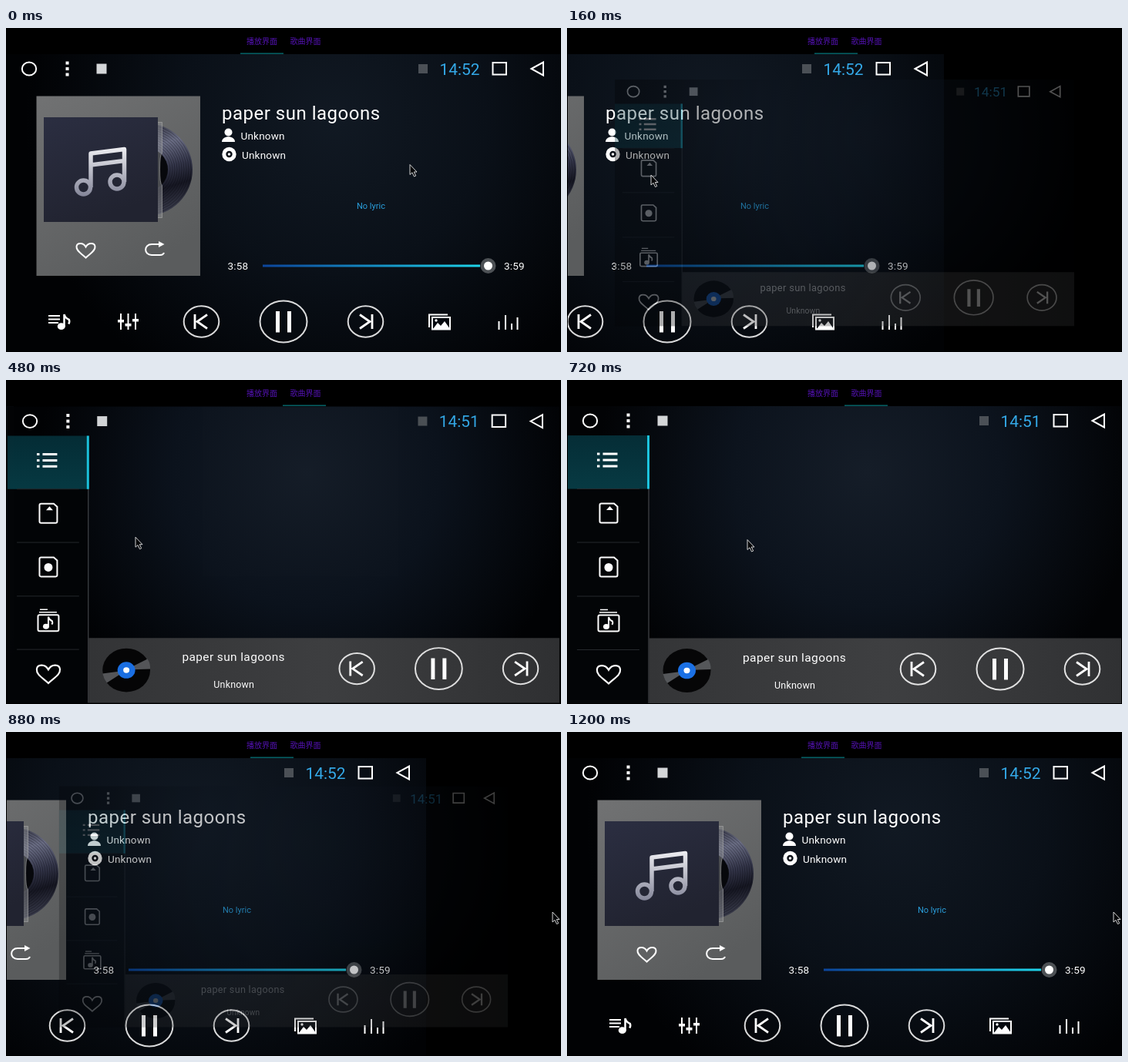
Animation of 720x421 px, one loop 2 s. Source, as an HTML page:

```html
<!DOCTYPE html>
<html lang="zh">
<head>
<meta charset="utf-8">
<style>
html, body { margin: 0; height: 100%; overflow: hidden; background: #000; }
svg { display: block; width: 100%; height: 100%; }
text { font-family: Roboto, sans-serif; fill: #fff; }
.tab { font: 10px "Noto Sans CJK SC", "Noto Sans CJK", sans-serif; fill: #5412b4; }
.clock { font-size: 20.9px; fill: #34a9e8; }
.title { font-size: 24px; letter-spacing: .5px; }
.info { font-size: 13.5px; letter-spacing: .2px; }
.line { fill: none; stroke: #fff; }
.thin { fill: none; stroke-width: 1; }
.fill { fill: #fff; }
</style>
</head>
<body>
<svg viewBox="0 0 720 421" stroke-width="2">
  <defs>
    <radialGradient id="bg1" gradientUnits="userSpaceOnUse" cx="425" cy="120" r="400">
      <stop stop-color="#111923"/><stop offset=".5" stop-color="#0a1018"/><stop offset="1" stop-color="#010204"/>
    </radialGradient>
    <radialGradient id="bg2" gradientUnits="userSpaceOnUse" cx="390" cy="120" r="350">
      <stop stop-color="#151d28"/><stop offset=".5" stop-color="#0c131d"/><stop offset="1" stop-color="#020305"/>
    </radialGradient>
    <linearGradient id="card" x2=".6" y2="1"><stop stop-color="#717273"/><stop offset="1" stop-color="#5a5c5d"/></linearGradient>
    <linearGradient id="cover" x2=".4" y2="1"><stop stop-color="#2b2e41"/><stop offset="1" stop-color="#212330"/></linearGradient>
    <linearGradient id="silver" gradientUnits="userSpaceOnUse" x1="0" y1="155" x2="0" y2="218">
      <stop stop-color="#eeeef2"/><stop offset="1" stop-color="#85879a"/>
    </linearGradient>
    <linearGradient id="vinyl" x1=".3" x2=".6" y2="1">
      <stop stop-color="#20212c"/><stop offset=".3" stop-color="#6a6d84"/><stop offset=".55" stop-color="#34364a"/>
      <stop offset=".75" stop-color="#161722"/><stop offset="1" stop-color="#3a3c4c"/>
    </linearGradient>
    <linearGradient id="progress" gradientUnits="userSpaceOnUse" x1="333" y1="0" x2="615" y2="0">
      <stop stop-color="#0c459c"/><stop offset="1" stop-color="#1ed3e8"/>
    </linearGradient>
    <linearGradient id="sel" x2="0" y2="1"><stop stop-color="#052d36"/><stop offset="1" stop-color="#073a43"/></linearGradient>
    <linearGradient id="panel" x2="1"><stop stop-color="#343537"/><stop offset=".5" stop-color="#3e3f41"/><stop offset="1" stop-color="#303133"/></linearGradient>
    <clipPath id="view"><path d="M1 34H719V420H1z"/></clipPath>

    <g id="status">
      <ellipse class="line" cx="30" cy="53" rx="9.2" ry="8.4"/>
      <path class="fill" d="M77.5 43.5h4v4h-4zM77.5 51h4v4h-4zM77.5 58.5h4v4h-4z"/>
      <path fill="#d4d6d8" d="M117.5 46.5h13v13h-13z"/>
      <path fill="#4b5056" d="M535 47h12v12h-12z"/>
      <path class="line" d="M631.5 45h17.5v15.5h-17.5zM681.5 53L697 44.5V61.5z"/>
    </g>
    <path id="heart" class="line" d="M0 9.5C-5.5 4-12.5 1-12-5C-11.5-10-3.5-11 0-4.5C3.5-11 11.5-10 12-5C12.5 1 5.5 4 0 9.5Z"/>
    <g id="skip">
      <ellipse class="line" rx="22.8" ry="20.2" stroke-opacity=".85"/>
      <path class="line" d="M-8.5-9.5V9.5M7.5-9L-5.5 0L7.5 9" stroke-width="2.8"/>
    </g>
    <g id="controls">
      <use href="#skip" x="253.5" y="381.5"/>
      <use href="#skip" transform="translate(466.5 381.5) scale(-1 1)"/>
      <ellipse class="line" cx="360" cy="381.5" rx="30.5" ry="27" stroke-opacity=".85"/>
      <path class="fill" d="M350 368h5v27.5h-5zM365 368h5v27.5h-5z"/>
    </g>
    <path id="sdcard" class="line" d="M-11-10.5Q-11-12.5-9-12.5H7.5L12-8.5V10.5Q12 12.5 10 12.5H-9Q-11 12.5-11 10.5Z"/>
    <g id="note">
      <ellipse class="fill" cx="-3" cy="4.5" rx="4" ry="3.5"/>
      <path class="line" d="M0 5V-8Q1-4 5-2.5Q6 0 4.5 2"/>
    </g>
  </defs>

  <text class="tab" x="312" y="20.5">播放界面</text>
  <text class="tab" x="368.5" y="20.5">歌曲界面</text>
  <path id="mark" d="M304 32.5h56v1.2h-56z" fill="#07787e"/>

  <g clip-path="url(#view)">
    <g id="player">
      <path d="M1 34H719V420H1z" fill="url(#bg1)"/>
      <use href="#status"/>
      <text class="clock" x="562.5" y="61">14:52</text>

      <path d="M39.5 88.5H252V322H39.5z" fill="url(#card)"/>
      <circle cx="182" cy="184" r="60" fill="url(#vinyl)"/>
      <g id="grooves" class="thin" stroke="#05060b" stroke-opacity=".3"></g>
      <circle cx="182" cy="184" r="28" fill="#07080c"/>
      <path d="M196 122.5h6.5v40q-3 2-3 21t3 21v42h-6.5z" fill="#8b8d92" fill-opacity=".5" stroke="#aaa" stroke-opacity=".6" stroke-width="1"/>
      <path d="M49 116h148v136h-148z" fill="url(#cover)"/>
      <g fill="none" stroke="url(#silver)" stroke-width="5.5" stroke-linejoin="round">
        <circle cx="100.5" cy="207" r="9"/>
        <circle cx="144" cy="200" r="9"/>
        <path d="M110 207V163L153.5 157.5V200M110 178L153.5 172.5"/>
      </g>
      <use href="#heart" x="103.5" y="289"/>
      <path class="line" d="M205 292Q204 295 200 295H189C178.5 295 178.5 281 189 281H200"/>
      <path class="fill" d="M198 277l7.500 4l-7.500 4z"/>

      <text class="title" x="280" y="118.500">paper sun lagoons</text>
      <circle class="fill" cx="288.500" cy="135.500" r="5"/>
      <path class="fill" d="M280 148c0-9 17-9 17 0z"/>
      <text class="info" x="304.500" y="145">Unknown</text>
      <circle class="fill" cx="289.500" cy="164" r="9.200"/>
      <circle cx="289.500" cy="164" r="3" fill="#fff" stroke="#0a0f17" stroke-width="2.400"/>
      <text class="info" x="306" y="169.500">Unknown</text>
      <text x="455" y="235" font-size="11" style="fill:#2a9fdc">No lyric</text>

      <text class="info" x="287.500" y="313.500">3:58</text>
      <text class="info" x="646" y="313.500">3:59</text>
      <path d="M333 307.500h282v3h-282z" fill="url(#progress)"/>
      <circle cx="625.500" cy="309" r="10" fill="#4d5155"/>
      <circle class="fill" cx="625.500" cy="309" r="5.500"/>

      <path class="line" d="M55 374h15M55 378.500h15M55 383h13"/>
      <use href="#note" transform="translate(75.500 382) scale(1.250)"/>
      <path class="line" d="M149 371v21M158.500 371v21M168 371v21"/>
      <path class="fill" d="M145 379h8v3.500h-8zM154.500 384h8v3.500h-8zM164 378h8v3.500h-8z"/>
      <use href="#controls"/>
      <path class="line" d="M549 389V372.500H573M553 376h23v15.500h-23z"/>
      <path class="fill" d="M554 391l6-8l4 4l5-6l7 10z"/>
      <circle class="fill" cx="558" cy="380" r="1.700"/>
      <path class="line" d="M639.500 381v11M648 373v19M656 384v8M663.500 376v16"/>
    </g>

    <g id="library">
      <path d="M1 34H719V420H1z" fill="url(#bg2)"/>
      <path d="M1 72H106V420H1z" fill="#030507"/>
      <use href="#status"/>
      <text class="clock" x="562.500" y="61">14:51</text>

      <path d="M1 72h105v69.500h-105z" fill="url(#sel)"/>
      <path class="thin" d="M13 141.500h81M13 211h81M13 281h81M13 350.500h81" stroke="#25292d"/>
      <path class="thin" d="M106 141v279" stroke="#505356"/>
      <path d="M104 72h3v69.500h-3z" fill="#1cc4de"/>
      <path class="line" d="M39 96h3.500M39 104h3.500M39 112h3.500M46.500 96h19M46.500 104h19M46.500 112h19" stroke-width="3"/>
      <use href="#sdcard" x="53.500" y="173"/>
      <path class="fill" d="M51 169l4.500-5l4.500 5z"/>
      <use href="#sdcard" x="53.500" y="243"/>
      <circle class="fill" cx="54" cy="243.500" r="5.500"/>
      <path class="line" d="M43 298.500h10M42 302h23" stroke-width="1.500"/>
      <rect class="line" x="40.500" y="305.500" width="27" height="21" rx="2"/>
      <use href="#note" x="54" y="316"/>
      <use href="#heart" transform="translate(54 382.500) scale(1.260)" stroke-width="1.700"/>

      <path d="M106.500 335.500H719V420H106.500z" fill="url(#panel)"/>
      <ellipse cx="155.500" cy="377.500" rx="31" ry="28.500" fill="#060607"/>
      <path d="M155 377L183 363Q187 369 186.500 376zM155 378L124.500 382Q126 389 130 394z" fill="#55575a"/>
      <ellipse cx="155.500" cy="377.500" rx="11.500" ry="10.800" fill="#1b70e4"/>
      <ellipse class="fill" cx="155.500" cy="377.500" rx="4" ry="3.700"/>
      <text x="228" y="365.500" font-size="15.500" letter-spacing=".4">paper sun lagoons</text>
      <text x="269" y="400.500" font-size="12.500" letter-spacing=".2">Unknown</text>
      <use href="#controls" x="202" y="-6"/>
    </g>
  </g>
  <path id="cursor" d="M0 0V13L3 10.300L5.500 15.500L7.700 14.500L5.300 9.500H9Z" fill="#050608" stroke="#e8e8e8" stroke-width=".9"/>
</svg>
<script>
const $ = id => document.getElementById(id);
const STEP = 80, LOOP = 2000, REST = 1200;

for (let r = 31; r < 60; r += 3)
  $('grooves').innerHTML += `<circle cx="182" cy="184" r="${r}"/>`;

// pointer stops: time, x, y
const stops = [[0, 524, 177.5], [80, 385, 184], [160, 109, 191], [240, 111, 196],
  [320, 124, 202], [720, 234, 207.5], [800, 450, 220], [880, 709, 234], [LOOP, 709, 234]];

function pointer(t) {
  const i = stops.findIndex(s => s[0] > t);
  const [t0, x0, y0] = stops[i - 1], [t1, x1, y1] = stops[i];
  const u = (t - t0) / (t1 - t0);
  return [x0 + (x1 - x0) * u, y0 + (y1 - y0) * u];
}

const settle = u => (1 - Math.min(u, 1)) ** 5;

// pager position: 0 = player, 1 = library; each swipe is a drag, then a settle
function position(t) {
  if (t >= REST) return 0;
  if (t <= 160) return .32 * (t / 160) ** 1.5;
  if (t < 720) return 1 - .68 * settle((t - 160) / 580);
  if (t <= 880) return 1 - .757 * ((t - 720) / 160) ** 1.5;
  return .243 * settle((t - 880) / 500);
}

function draw(now) {
  const t = Math.min(Math.floor(now % LOOP / STEP) * STEP, REST);
  const p = position(t);
  $('player').setAttribute('transform', `translate(${Math.round(-718 * p)} 0)`);
  $('library').setAttribute('transform',
    `translate(360 227.5) scale(${.75 + .25 * p}) translate(-360 -227.5)`);
  $('library').setAttribute('opacity', p);
  $('mark').setAttribute('transform', `translate(${Math.floor(56 * p)} 0)`);
  $('cursor').setAttribute('transform', `translate(${pointer(t)})`);
}

let start;
function tick(now) {
  start ??= now;
  draw(now - start);
  requestAnimationFrame(tick);
}
draw(0);
requestAnimationFrame(tick);
</script>
</body>
</html>
```
